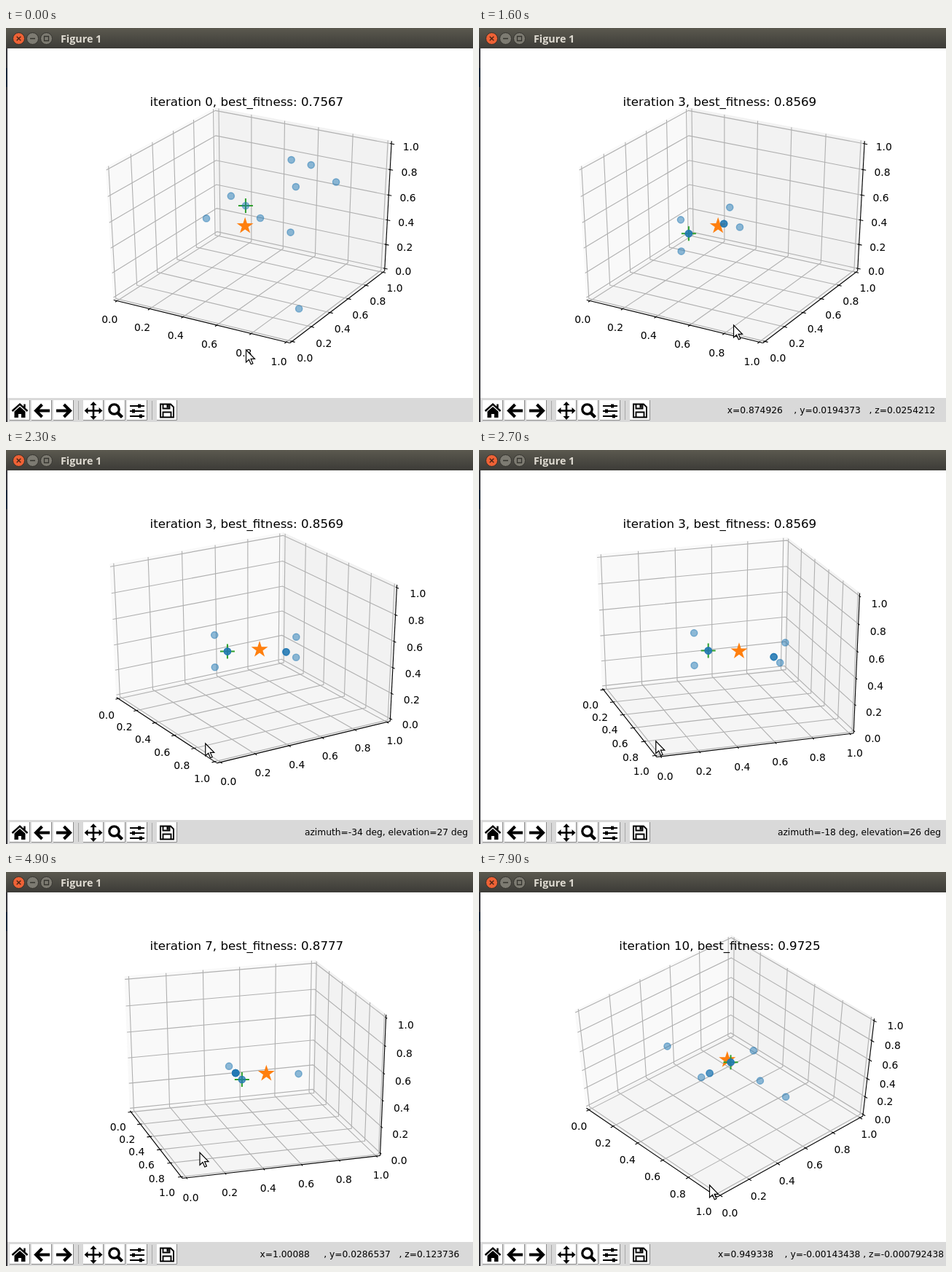
Animation, 641 px wide and 541 px high, one loop 8 s. Source, as an HTML page:

```html
<!DOCTYPE html>
<html lang="en">
<head>
<meta charset="utf-8">
<title>Figure 1</title>
<style>
  html, body { margin: 0; width: 100%; height: 100%; overflow: hidden; background: #fff; }
  svg { display: block; width: 641px; height: 541px; }
  text { font-family: "DejaVu Sans", sans-serif; white-space: pre; }
  .tick { font-size: 13.89px; text-anchor: middle; }
  .grid { fill: none; stroke: #b0b0b0; stroke-width: 1.11; }
  .axis { fill: none; stroke: #000; stroke-width: 1.11; }
  .dot { fill: #1f77b4; stroke: #1f77b4; stroke-width: 1.39; fill-opacity: .5; stroke-opacity: .5; }
  .star { fill: #ff7f0e; stroke: #ff7f0e; stroke-width: 1.39; }
  .plus { stroke: #2ca02c; stroke-width: 2; }
</style>
</head>
<body>
<svg viewBox="0 0 641 541">
  <defs>
    <linearGradient id="bar" x2="0" y2="1">
      <stop offset="0" stop-color="#5b594f"/>
      <stop offset="1" stop-color="#3c3b37"/>
    </linearGradient>
  </defs>
  <rect width="641" height="541" fill="#fff"/>
  <g id="plot"></g>
  <text id="title" x="330.4" y="107" font-size="16.67" text-anchor="middle"></text>

  <rect width="641" height="28" fill="url(#bar)"/>
  <rect y="28" width="2" height="513" fill="#35343a"/>
  <rect y="55" width="1.5" height="26" fill="#0a2038"/>
  <circle cx="17.5" cy="14.5" r="8" fill="#ee6236" stroke="#35302a"/>
  <path d="M14.7 11.7l5.6 5.6m0-5.6l-5.6 5.6" stroke="#4a2416" stroke-width="1.4"/>
  <g fill="#7d7b72" stroke="#35342f">
    <circle cx="36.5" cy="14.5" r="8"/>
    <circle cx="55.5" cy="14.5" r="8"/>
    <path d="M33 14.5h7M52.5 11.5h6v6h-6z" fill="none" stroke-width="1.3"/>
  </g>
  <text x="75" y="20" font-size="14.3" font-weight="700" fill="#dfdbd2" style="font-family:'Open Sans',sans-serif">Figure 1</text>

  <rect x="2" y="508" width="639" height="33" fill="#d9d9d9"/>
  <g id="buttons"></g>
  <path d="M99.5 512v26M200.5 512v26" stroke="#a8a8a8"/>
  <g fill="#000" stroke="#000">
    <path d="M8.5 526L19 516.5 29.5 526M25.5 516.5v5" fill="none" stroke-width="2.4"/>
    <path d="M11.5 526.5L19 520l7.5 6.5V535H21v-5h-4v5h-5.5z" stroke="none"/>
    <path d="M60 525.5H43M49.5 517l-8.5 8.5 8.5 8.5" fill="none" stroke-width="4"/>
    <path d="M69 525.5h17M79.5 517l8.5 8.5-8.5 8.5" fill="none" stroke-width="4"/>
    <path d="M111 525.5h18M120 516.5v18" stroke-width="2.6"/>
    <path d="M120 513l4.5 5h-9zM120 538l4.5-5h-9zM107.5 525.5l5-4.5v9zM132.5 525.5l-5-4.5v9z" stroke="none"/>
    <circle cx="148.5" cy="523.5" r="6.7" fill="none" stroke-width="3.3"/>
    <path d="M153.5 528.5l6 6" stroke-width="4.5"/>
    <path d="M170 519h20M170 526h20M170 533h20" stroke-width="2"/>
    <path d="M181 516.5h4v5h-4zM173 523.5h4v5h-4zM183 530.5h4v5h-4z" stroke="none"/>
    <path d="M212 516.5h14l4 4v14h-18zM215.5 516.5v6h9v-6M215.5 534.5v-7h11v7" fill="none" stroke-width="1.9"/>
    <path d="M220.5 517h3v4.5h-3z" stroke="none"/>
  </g>
  <text id="status" x="638" y="529" font-size="12.25" text-anchor="end"></text>
  <path id="cursor" d="M0 0V17L4 13.3 6.8 19.7 9.4 18.6 6.6 12.3H12Z" fill="#fff" stroke="#000" stroke-width="1.2"/>
</svg>
<script>
const $ = id => document.getElementById(id);
const LOOP = 8000, STEP = 100, ITERATION = 525, LAG = 50;
const PAD = 1 / 48, LO = -PAD, HI = 1 + PAD, LABEL_GAP = 0.0738;
const TICKS = Array.from({ length: 6 }, (_, i) => i / 5);

const clamp = (v, lo, hi) => Math.min(hi, Math.max(lo, v));

function sample(keys, t) {
  const i = clamp(keys.findIndex(k => k[0] > t), 1, keys.length - 1);
  const last = t >= keys[keys.length - 1][0] ? keys.length - 1 : i;
  const [from, to] = [keys[last - 1], keys[last]];
  const k = clamp((t - from[0]) / (to[0] - from[0]), 0, 1);
  return from.slice(1).map((v, j) => v + (to[j + 1] - v) * k);
}

// Pointer path: time, x, y. Dragging it turns the camera.
const pointer = t => sample([
  [0, 329.5, 442], [1600, 349.5, 408], [1700, 338, 409], [2000, 303.5, 405],
  [2600, 244, 401], [2800, 241.5, 398.5], [4200, 255.5, 384], [5000, 267.5, 385.5],
  [6100, 319, 437], [6200, 323.5, 437], [7900, 316.5, 430]
], t);
const DRAGS = [{ from: 1700, to: 2800 }, { from: 5000, to: 6200 }];

function angles(t) {
  let azimuth = -60, elevation = 30;
  for (const { from, to } of DRAGS) {
    const [x0, y0] = pointer(from), [x, y] = pointer(clamp(t, from, to));
    azimuth += 0.44 * (x0 - x);
    elevation += 0.487 * (y - y0);
  }
  return [azimuth, elevation];
}

// The search pauses while the view is dragged
function iterationAt(t) {
  const paused = DRAGS.reduce((sum, d) => sum + clamp(t, d.from, d.to) - d.from, 0);
  return Math.floor((t - paused) / ITERATION);
}

// Candidates are relative to the centre of the cube; each descends from another by changed genes
const FLOOR = -0.249;
const mutate = (parent, genes) => ({ ...parent, ...genes });
const facing = (right, up) =>
  ({ x: 0.866 * right - 0.25 * up, y: 0.5 * right + 0.433 * up, z: 0.866 * up });
const STAR = { x: -0.104, y: 0.115, z: -0.1255 };
const START = [
  facing(0.205, 0.422), facing(0.306, 0.387), facing(0.434, 0.27), facing(0.228, 0.237),
  facing(-0.104, 0.174), facing(-0.029, 0.107), facing(0.046, 0.022), facing(-0.23, 0.02),
  facing(0.201, -0.076), facing(0.244, -0.601)
];
const F = { x: -0.2, y: -0.023, z: -0.145 };
const A = mutate(F, { y: -0.1, z: 0.004 }), B = mutate(A, { z: FLOOR });
const C = mutate(F, { y: 0.405 }), E = mutate(B, { y: 0.342 }), D = mutate(E, { x: -0.102 });
const G = mutate(F, { z: 0.195 }), P = mutate(F, { x: -0.088 });
const Q = mutate(F, { x: -0.319 }), S = mutate(F, { x: -0.422 });
const T = mutate(F, { x: -0.154, z: FLOOR });
const R = mutate(P, { y: 0.287 }), W = mutate(P, { y: 0.125 });
const U = mutate(W, { x: 0.138 }), V = mutate(W, { x: 0.331 });

// Copies of the elite fill each generation up to ten
function generation(fitness, best, singles, elite = [best]) {
  const points = [...singles];
  while (points.length < 10) points.push(elite[points.length % elite.length]);
  return { fitness, best, points };
}
const GENERATIONS = [
  generation(0.7567, START[5], START),
  generation(0.7567, START[5], [...START.slice(3, 8), A, C, E]),
  generation(0.8569, F, [...START.slice(4, 6), A, B, C, D], [E, F]),
  generation(0.8569, F, [A, B, C, D], [E, F]),
  generation(0.8569, F, [A, B, E, E]),
  generation(0.8777, P, [G, P], [F]),
  generation(0.8777, P, [Q, P, P], [F]),
  generation(0.8777, P, [Q, R, P, P], [F]),
  generation(0.8777, P, [Q, R, S], [F, P]),
  generation(0.9725, W, [Q, R, S, U], [P, W]),
  generation(0.9725, W, [S, T, R, U, V], [P, W])
];

// Perspective view from ten units away
function camera(azimuth, elevation) {
  const az = azimuth * Math.PI / 180, el = elevation * Math.PI / 180;
  const ca = Math.cos(az), sa = Math.sin(az), ce = Math.cos(el), se = Math.sin(el);
  return ({ x, y, z }) => {
    const flat = ca * x + sa * y;
    const depth = 10 - ce * flat - se * z;
    return [336.7 + 2681 * (ca * y - sa * x) / depth, 265.4 - 1998 * (ce * z - se * flat) / depth];
  };
}

const pair = p => p.map(v => v.toFixed(2)).join(" ");
const path = (cls, pts, end = "") => `<path class="${cls}" d="M${pts.map(pair).join("L")}${end}"/>`;

function box(view) {
  const at = ([x, y, z]) => view({ x: x - 0.5, y: y - 0.5, z: z - 0.5 });
  const pane = (color, ...corners) =>
    `<g fill="${color}" stroke="${color}">${path("pane", corners.map(at), "Z")}</g>`;
  const line = (cls, ...pts) => path(cls, pts.map(at));
  const far = LO - LABEL_GAP, near = HI + LABEL_GAP;
  const out = 0.2 / 12, inn = 0.1 / 12;
  const axes = [
    { edge: v => [v, LO, LO], grid: v => [[v, LO, LO], [v, HI, LO], [v, HI, HI]],
      tick: v => [[v, LO - out, LO], [v, LO + inn, LO]], label: v => [v, far, far] },
    { edge: v => [HI, v, LO], grid: v => [[HI, v, LO], [LO, v, LO], [LO, v, HI]],
      tick: v => [[HI + out, v, LO], [HI - inn, v, LO]], label: v => [near, v, far] },
    { edge: v => [HI, HI, v], grid: v => [[HI, HI, v], [LO, HI, v], [LO, LO, v]],
      tick: v => [[HI + out, HI, v], [HI - inn, HI, v]], label: v => [near, near, v] }
  ];
  let svg = pane("#f9f9f9", [LO, LO, LO], [LO, HI, LO], [LO, HI, HI], [LO, LO, HI])
    + pane("#f2f2f2", [LO, HI, LO], [HI, HI, LO], [HI, HI, HI], [LO, HI, HI])
    + pane("#f5f5f5", [LO, LO, LO], [HI, LO, LO], [HI, HI, LO], [LO, HI, LO]);
  for (const axis of axes) {
    svg += line("axis", axis.edge(LO), axis.edge(HI));
    for (const v of TICKS) svg += line("grid", ...axis.grid(v));
    for (const v of TICKS) {
      const [x, y] = at(axis.label(v));
      svg += line("axis", ...axis.tick(v))
        + `<text class="tick" x="${x.toFixed(1)}" y="${(y + 11).toFixed(1)}">${v.toFixed(1)}</text>`;
    }
  }
  return svg;
}

function star([x, y]) {
  const tips = Array.from({ length: 10 }, (_, i) => {
    const r = i % 2 ? 3.74 : 9.8, a = i * Math.PI / 5;
    return [x + r * Math.sin(a), y - r * Math.cos(a)];
  });
  return path("star", tips, "Z");
}

const plus = p => path("plus", [p], "m-10 0h20m-10-10v20");
const dot = ([x, y]) => `<circle class="dot" cx="${x.toFixed(2)}" cy="${y.toFixed(2)}" r="4.6"/>`;

function statusText(t) {
  if (t < 500) return "";
  if (DRAGS.some(d => t >= d.from && t < d.to + 200)) {
    const [azimuth, elevation] = angles(t - LAG).map(Math.round);
    return `azimuth=${azimuth} deg, elevation=${elevation} deg `;
  }
  const [x, y, z] = sample([
    [1600, 0.874926, 0.0194373, 0.0254212],
    [4200, 1.01291, 0.0356743, 0.152793],
    [7900, 0.949338, -0.00143438, -0.000792438]
  ], t).map(v => String(Number(v.toPrecision(6))).padEnd(12));
  return `x=${x}, y=${y}, z=${z}`;
}

function draw(t) {
  const view = camera(...angles(t));
  const iteration = iterationAt(t);
  const { fitness, best, points } = GENERATIONS[iteration];
  $("plot").innerHTML = box(view) + star(view(STAR)) + plus(view(best))
    + points.map(p => dot(view(p))).join("");
  $("title").textContent = `iteration ${iteration}, best_fitness: ${fitness.toFixed(4)}`;
  $("status").textContent = statusText(t);
  $("cursor").setAttribute("transform", `translate(${pointer(t).join(" ")})`);
}

$("buttons").innerHTML = [5, 35, 65, 106, 136, 166, 207].map(x =>
  `<rect x="${x}" y="511" width="28" height="28" fill="#fff"/>`
  + `<path d="M${x + 27.5} 511v27.5h-27.5" fill="none" stroke="#8a8a8a"/>`).join("");

const begin = performance.now();
let shown = -1;
function loop(now) {
  const t = Math.floor(Math.max(0, now - begin) % LOOP / STEP) * STEP;
  if (t !== shown) draw(shown = t);
  requestAnimationFrame(loop);
}
loop(begin);
</script>
</body>
</html>
```
